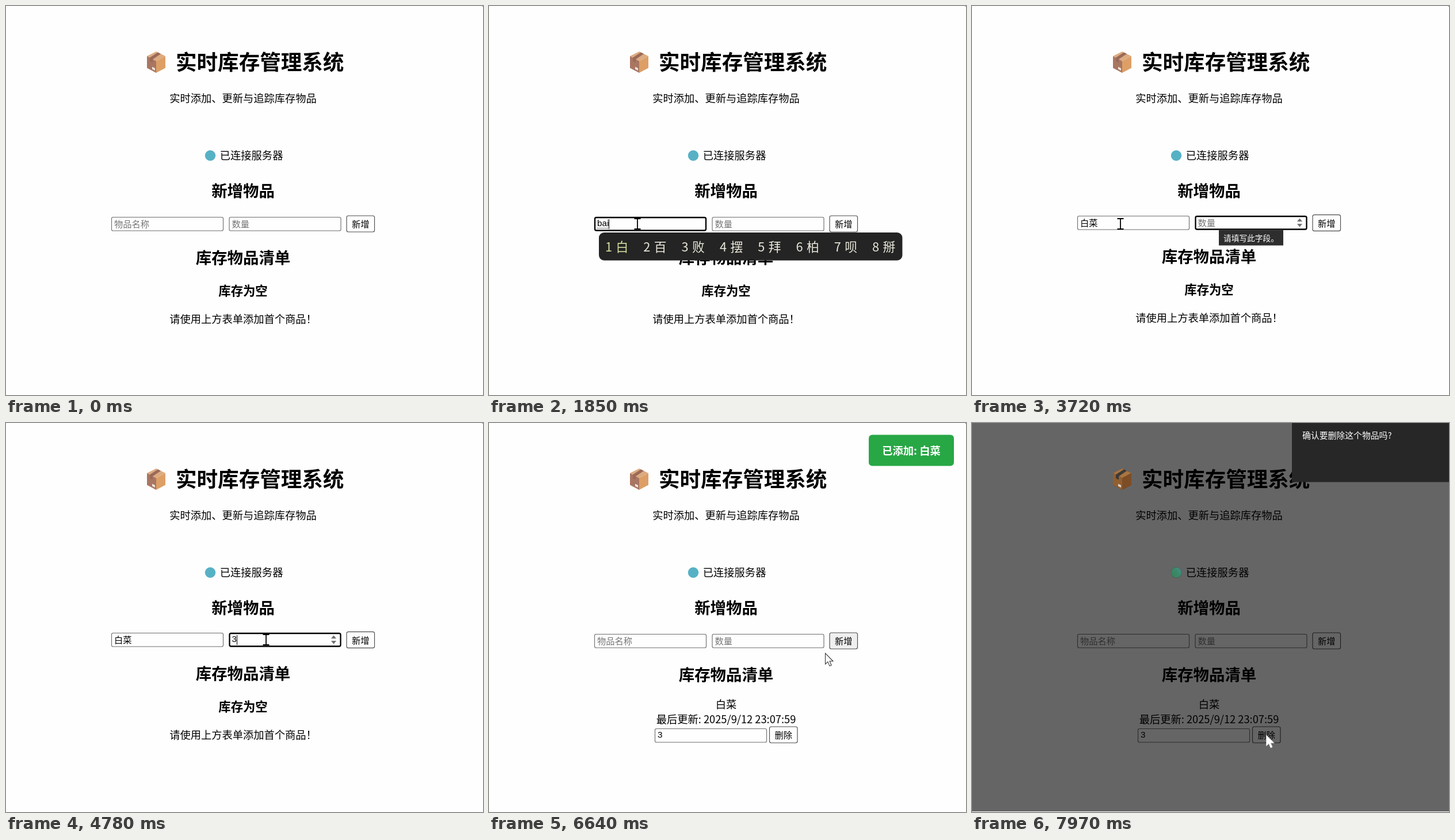
These frames come from a looping animation (829 by 675 pixels, 8 s). An HTML page with a canvas:

```html
<!DOCTYPE html>
<html lang="zh-CN">
<head>
<meta charset="utf-8">
<title>实时库存管理系统</title>
<style>
html, body { margin: 0; width: 829px; height: 675px; overflow: hidden; background: #fefefe; }
canvas { display: block; }
</style>
</head>
<body>
<canvas id="stage" width="829" height="675"></canvas>
<script>
const ctx = document.getElementById('stage').getContext('2d');
const LOOP = 8000, EM = 18.28, MID = 412, PAPER = '#fefefe';
const CJK = '"Noto Sans CJK SC", "Noto Sans CJK", sans-serif';
const FIELD = '"Liberation Sans", ' + CJK;

// [from ms, x, y, shape]
const pointer = [
  [0, 0, 0, ''], [260, 309, 469, 'arrow'], [520, 274, 421, 'arrow'], [790, 258, 378, 'beam'],
  [4510, 273, 354, 'arrow'], [4780, 452, 376, 'beam'], [5040, 631, 386, 'arrow'],
  [5320, 641, 386, 'arrow'], [5580, 621, 382, 'arrow'], [6640, 584, 399, 'arrow'],
  [6910, 494, 526, 'arrow'], [7180, 511, 541, 'arrow']
];
// [from ms, typed letters, candidates]
const typing = [
  [1850, 'bai', '白 百 败 摆 拜 柏 呗 掰'],
  [2390, 'bai c', '白菜 百草 白瓷 白茶 白醋 百出 拜辞 白炽'],
  [2650, 'bai cai', '白菜 * 白 百 败 摆 拜 柏']
];

const during = (t, a, b) => t >= a && t < b;
const latest = (list, t) => list.filter(row => row[0] <= t).pop();

function text(str, x, y, size, opt = {}) {
  ctx.font = `${opt.weight || 400} ${size}px ${opt.family || CJK}`;
  ctx.textAlign = opt.align || 'left';
  ctx.fillStyle = opt.color || '#000';
  ctx.fillText(str, x, y + size * 0.38);
}

const centered = (str, y, size, weight) => text(str, MID, y, size, { weight, align: 'center' });

function poly(points, fill) {
  ctx.beginPath();
  for (let i = 0; i < points.length; i += 2) ctx.lineTo(points[i], points[i + 1]);
  ctx.closePath();
  ctx.fillStyle = fill;
  ctx.fill();
}

function disc(x, y, r, fill) {
  ctx.beginPath();
  ctx.arc(x, y, r, 0, Math.PI * 2);
  ctx.fillStyle = fill;
  ctx.fill();
}

function panel(x, y, w, h, r, fill, line, width = 1.15) {
  ctx.beginPath();
  ctx.roundRect(x, y, w, h, r);
  ctx.fillStyle = fill;
  ctx.fill();
  if (!line) return;
  ctx.strokeStyle = line;
  ctx.lineWidth = width;
  ctx.stroke();
}

function field(x, y, { value = '', hint = '', focus, caret, spin, composing } = {}) {
  if (focus) panel(x + 1, y + 1, 193, 22.5, 2.5, PAPER, '#000', 2.3);
  else panel(x + 0.5, y + 0.5, 194, 23.5, 2.5, PAPER, '#6e6e6e');
  const latin = /^[\x00-\x7f]+$/.test(value);
  text(value || hint, x + 5, y + (latin ? 10.7 : 12), 15.24,
    { family: FIELD, color: value ? '#000' : '#757575' });
  const end = x + 5 + (value ? ctx.measureText(value).width : 0);
  if (composing) {
    ctx.fillStyle = '#000';
    for (let u = x + 5; u < end; u += 2) ctx.fillRect(u, y + 19, 1, 1);
  }
  if (caret) {
    ctx.fillStyle = '#000';
    ctx.fillRect(Math.round(end), y + 4, 1, 17);
  }
  if (spin) {
    const c = x + 182, m = y + 12;
    poly([c - 4.5, m - 2, c, m - 7.5, c + 4.5, m - 2], '#707070');
    poly([c - 4.5, m + 2, c, m + 7.5, c + 4.5, m + 2], '#707070');
  }
}

function button(label, x, y, fill) {
  panel(x + 0.5, y + 0.5, 48.5, 28, 3, fill, '#4c4c4c');
  text(label, x + 24.7, y + 15, 15.24, { align: 'center' });
}

function parcel(top, left, right, tape, label) {
  poly([245, 87, 261, 79, 277, 87, 261, 95.5], top);
  poly([245, 87, 261, 95.5, 261, 116, 245, 107.5], left);
  poly([277, 87, 261, 95.5, 261, 116, 277, 107.5], right);
  poly([264, 80.5, 269, 83, 255, 92.5, 255, 98.5, 250, 96, 250, 89.5], tape);
  poly([254, 105.5, 259, 108, 259, 112, 254, 109.5], label);
}

function cabbage(x, y) {
  for (let i = 0; i < 7; i++) {
    const a = i * 0.9 + 0.3;
    disc(x + Math.cos(a) * 7, y + Math.sin(a) * 6, 4.5, i % 2 ? '#5c9f2d' : '#7cba3e');
  }
  disc(x - 1, y - 1, 6, '#86c348');
  ctx.strokeStyle = '#c9e28f';
  ctx.lineWidth = 1.3;
  ctx.beginPath();
  ctx.moveTo(x + 9, y + 9);
  ctx.lineTo(x - 3, y - 3);
  ctx.moveTo(x + 4, y - 4);
  ctx.lineTo(x + 2, y + 2);
  ctx.lineTo(x - 5, y + 3);
  ctx.stroke();
}

function candidates(list) {
  const words = list.split(' ');
  const wide = w => w === '*' ? 29 : w.length * 21.8;
  const step = w => wide(w) + 44.5;
  const total = words.reduce((sum, w) => sum + step(w), 0);
  panel(191, 393, total - 3, 48.5, 9, '#242424');
  let x = 202;
  words.forEach((w, i) => {
    const color = i ? '#e8e6d9' : '#d3e09f';
    text(String(i + 1), x, 418, 21.8, { color });
    if (w === '*') cabbage(x + 33, 418);
    else text(w, x + 18.5, 418, 21.8, { color });
    x += step(w);
  });
}

function drawPointer(x, y, shape, solid) {
  if (shape === 'beam') {
    ctx.strokeStyle = '#000';
    ctx.lineWidth = 1.8;
    ctx.beginPath();
    for (const side of [-1, 1]) {
      const end = y + side * 9;
      ctx.moveTo(x - 5.5, end);
      ctx.lineTo(x + 5.5, end);
    }
    ctx.moveTo(x, y - 9);
    ctx.lineTo(x, y + 9);
    ctx.stroke();
  } else if (shape === 'arrow') {
    ctx.save();
    ctx.translate(x + 0.5, y + 0.5);
    ctx.scale(1.08, 1.08);
    poly([0, 0, 0, 17.5, 4, 13.8, 7, 20.5, 9.8, 19.2, 7, 12.8, 12.5, 12.8], '#fff');
    ctx.strokeStyle = solid ? '#ddd' : '#333';
    ctx.lineWidth = solid ? 0.6 : 1;
    ctx.stroke();
    ctx.restore();
  }
}

function drawForm(t, dy) {
  const ime = during(t, 1850, 2920) ? latest(typing, t) : null;
  const chosen = during(t, 2920, 6110);
  field(183, 366 + dy, {
    value: ime ? ime[1] : chosen ? '白菜' : '',
    hint: '物品名称',
    focus: during(t, 1050, 3190),
    caret: during(t, 1050, 1590) || during(t, 1850, 3190),
    composing: !!ime
  });
  const active = during(t, 3190, 5850);
  field(387.5, 366 + dy, {
    value: during(t, 4250, 6110) ? '3' : '',
    hint: '数量',
    focus: active,
    spin: active,
    caret: during(t, 3190, 3720) || during(t, 4250, 5320)
  });
  const fill = t < 5320 || t >= 7970 ? PAPER : t < 6640 ? '#e5e5e5' : '#efefef';
  button('新增', 591.5, 363.5 + dy * 0.8, fill);
  return ime;
}

function drawList(t, dy) {
  centered('库存物品清单', 437 + dy, EM * 1.5, 700);
  if (t < 5850) {
    centered('库存为空', 493.5 + dy, EM * 1.17, 700);
    centered('请使用上方表单添加首个商品！', 543.5 + dy, EM);
    return;
  }
  centered('白菜', 488 + dy, EM);
  centered('最后更新: 2025/9/12 23:07:59', 514 + dy, EM);
  field(288, 530 + dy, { value: '3' });
  button('删除', 487, 526.5 + dy, during(t, 7180, 7970) ? '#f0f0f0' : PAPER);
}

function drawDialog() {
  ctx.fillStyle = 'rgba(0,0,0,.6)';
  ctx.fillRect(0, 0, 829, 674);
  parcel('#a97440', '#925f30', '#7d4d25', '#3c3a38', '#d8d2c8');
  const shade = ctx.createLinearGradient(346, 266, 364, 252);
  shade.addColorStop(0, '#37835c');
  shade.addColorStop(0.6, '#3d8a6a');
  shade.addColorStop(1, '#4a8f9c');
  disc(355, 259.5, 9, shade);
  ctx.fillStyle = '#272727';
  ctx.fillRect(556, 0, 273, 102.5);
  text('确认要删除这个物品吗?', 574, 21, 14.85, { color: '#fff', weight: 500 });
}

function draw(t) {
  ctx.fillStyle = PAPER;
  ctx.fillRect(0, 0, 829, 675);
  ctx.fillStyle = '#444';
  ctx.fillRect(828, 0, 1, 1);

  parcel('#dcab80', '#a97662', '#dd9f66', '#9b6a58', '#eee4dc');
  text('实时库存管理系统', 295, 97, EM * 2, { weight: 700 });
  centered('实时添加、更新与追踪库存物品', 160, EM);
  disc(355, 259.5, 9.2, '#57b1c5');
  text('已连接服务器', 371.8, 259.5, EM);
  centered('新增物品', 320.5, EM * 1.5, 700);

  const dy = during(t, 2920, 6110) ? -2 : 0;
  const ime = drawForm(t, dy);
  drawList(t, dy);
  if (ime) candidates(ime[2]);

  if (during(t, 3720, 4250)) {
    ctx.fillStyle = '#2e2e2e';
    ctx.fillRect(429, 389, 112, 26.5);
    text('请填写此字段。', 437, 402.5, 13.7, { color: '#fff' });
  }
  if (t >= 6110 && t < 7970) {
    ctx.globalAlpha = t < 6380 ? 0.6 : 1;
    panel(660, 20.5, 148, 54, 6, '#28a745');
    text('已添加: 白菜', 734, 48.5, EM, { weight: 700, align: 'center', color: '#fff' });
    ctx.globalAlpha = 1;
  }

  const asking = t >= 7970;
  if (asking) drawDialog();
  else if (t >= 7710) disc(512, 542.5, 14.5, 'rgba(255,255,0,.5)');
  const [, x, y, shape] = latest(pointer, t);
  drawPointer(x, y, shape, asking);
}

const start = performance.now();
function tick() {
  draw((performance.now() - start) % LOOP);
  requestAnimationFrame(tick);
}
tick();
</script>
</body>
</html>
```
